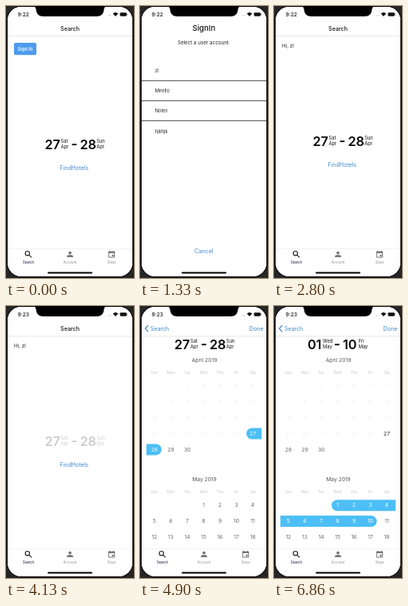
Recreate the animation shown at these times as an HTML page. Size 160 by 340 pixels, loop 8 s.

```html
<!DOCTYPE html>
<html lang="en">
<head>
<meta charset="utf-8">
<title>Hotel search</title>
<style>
html, body { margin: 0; width: 100%; height: 100%; overflow: hidden; background: #262626; }
svg { display: block; width: 100%; height: 100%; font-family: Inter, Roboto, sans-serif; }
</style>
</head>
<body>
<svg id="stage" viewBox="0 0 160 340"></svg>
<script>
const LOOP = 8000, STEP = 70;
const BLUE = '#4189cb', RANGE = '#4dbff6';
const HEADER = 38, TABS = 304, HEIGHT = 340, WIDTH = 156;

const text = (x, y, size, str, fill = '#111', extra = '') =>
  `<text x="${x}" y="${y}" font-size="${size}" fill="${fill}" ${extra}>${str}</text>`;
const mid = (x, y, size, str, fill, extra = '') =>
  text(x, y, size, str, fill, `text-anchor="middle" ${extra}`);
const rect = (x, y, w, h, fill, extra = '') =>
  `<rect x="${x}" y="${y}" width="${w}" height="${h}" fill="${fill}" ${extra}/>`;
const group = (id, body, extra = '') => `<g id="${id}" ${extra}>${body}</g>`;

// One big day number with weekday and month beside it; y is the vertical centre
const dateLabel = (x, y, [day, weekday, month], gap = 20) =>
  text(x, y + 5.7, 16.2, day, '#080808', 'font-weight="600" letter-spacing="-.2"') +
  text(x + gap, y - 2, 5.8, weekday) + text(x + gap, y + 5, 5.8, month);

const dateRange = (y, from, to, x = 48.5, gap = 20) =>
  dateLabel(x, y, from, gap) + rect(x + 34, y - .7, 5.7, 1.8, '#080808') +
  dateLabel(x + 44, y, to, gap + .7);

const APR27 = ['27', 'Sat', 'Apr'], APR28 = ['28', 'Sun', 'Apr'];
const MAY1 = ['01', 'Wed', 'May'], MAY10 = ['10', 'Fri', 'May'];

// Calendar
const colX = c => 18 + 20.5 * c;
const rowY = r => 19.8 * r;

function month(title, titleY, firstCol, count, rows, dayFill) {
  const top = titleY + 32;
  let out = mid(80.5, titleY + 2.4, 6.7, title, '#555');
  ['Sun', 'Mon', 'Tue', 'Wed', 'Thu', 'Fri', 'Sat'].forEach((name, c) => {
    out += mid(colX(c), titleY + 16.7, 4.7, name, '#c4c4c4');
  });
  for (let d = 1; d <= count; d++) {
    const cell = d - 1 + firstCol, r = Math.floor(cell / 7);
    if (r < rows) out += mid(colX(cell % 7), top + rowY(r) + 2.4, 6.6, d, dayFill(d));
  }
  return out;
}

// Selection bar: rounded on the left, on the right, or on both sides
function bar(x1, x2, y, left, right) {
  const h = 14, l = left ? h / 2 : 0, r = right ? h / 2 : 0;
  return `<path fill="${RANGE}" d="M${x1 + l} ${y - h / 2}H${x2 - r}a${r} ${r} 0 0 1 ${r} ${r}v${h - 2 * r}` +
    `a${r} ${r} 0 0 1 ${-r} ${r}H${x1 + l}a${l} ${l} 0 0 1 ${-l} ${-l}v${2 * l - h}a${l} ${l} 0 0 1 ${l} ${-l}z"/>`;
}

function calendar(stage) {
  const titles = [
    dateRange(48, APR27, APR28, 43),
    dateRange(48, MAY1, APR28, 42, 19),
    dateRange(48, MAY1, MAY10, 42, 19)
  ];
  const bars = [
    bar(133, 152, 159.5, true, false) + bar(8, 27, 179.4, false, true),
    bar(72, 89, 249.3, true, true),
    bar(72, 152, 249.3, true, false) + bar(8, 128.5, 269.1, false, true)
  ];
  const april = d => d < 27 ? '#f1f1f1' : stage === 0 && d < 29 ? '#fff' : d === 27 ? '#222' : '#666';
  const may = d => d <= [0, 1, 10][stage] ? '#fff' : '#666';
  return titles[stage] + bars[stage] +
    month('April 2019', 68, 1, 30, 5, april) + month('May 2019', 217, 3, 31, 5, may);
}

// Screens
const statusBar =
  '<path d="M34 0Q37 1 37.5 4C38 10 41 13 47 13H113C119 13 122 10 122.5 4Q123 1 126 0z"/>' +
  text(14.5, 13, 6.7, '', '#111', 'id="clock" font-weight="500"') +
  [128, 130.3].map(x => rect(x, 11.4, 1, 1, '#aaa')).join('') +
  '<path d="M133.6 9.6Q136.9 6.6 140.2 9.6L136.9 13z" fill="#111"/>' +
  rect(142.5, 8.2, 8.3, 4.5, '#111', 'rx="1.1"') + rect(151.3, 9.5, .8, 2, '#777');

const home = rect(2, HEADER, WIDTH, 270, '#fff') +
  group('signIn', rect(10, 46, 28, 15.3, '#4c9cec', 'rx="2"') +
    mid(24, 55.7, 5.6, 'Sign In', '#fff', 'font-weight="600"')) +
  text(10, 52.4, 6.3, 'Hi, zl', '#222', 'id="greeting"') +
  group('search', group('dates', dateRange(173, APR27, APR28)) +
    mid(85.2, 205.3, 7.1, 'FindHotels', BLUE));

const card = rect(-1, HEADER, 2, 270, '#000', 'opacity=".12"') +
  rect(1, HEADER, 1, 270, '#000', 'opacity=".5"') +
  rect(2, HEADER, WIDTH, 270, '#fff') +
  [0, 1, 2].map(i => group('calendar' + i, calendar(i))).join('');

const header = rect(2, 0, WIDTH, HEADER, '#fff') + rect(2, 37.6, WIDTH, .6, '#d5d5d5') +
  mid(80, 30.8, 7.1, 'Search', '#111', 'id="title" font-weight="500"') +
  group('back', `<path d="M10.2 24L6.6 28.2L10.2 32.4" fill="none" stroke="${BLUE}" stroke-width="1.2"/>` +
    text(13, 30.7, 7, 'Search', BLUE) +
    text(154.5, 30.7, 7.2, 'Done', BLUE, 'text-anchor="end"'));

const tabs = rect(2, TABS, WIDTH, 36, '#fff') + rect(2, TABS - .3, WIDTH, .4, '#ddd') +
  '<g fill="none" stroke="#222" stroke-width="1.1"><circle cx="26.8" cy="309.2" r="2.7"/><path d="M28.9 311.3L32 314.4"/></g>' +
  '<g fill="#777"><circle cx="80" cy="308.6" r="1.9"/><path d="M76.2 314v-1.2q0-1.7 3.8-1.7t3.8 1.7v1.2z"/></g>' +
  '<path d="M128.3 307.3h7.4v6.8h-7.4z" fill="none" stroke="#777"/>' +
  rect(128, 306.8, 8, 2.2, '#777') + rect(129.2, 305.8, 1, 1.5, '#777') + rect(133.8, 305.8, 1, 1.5, '#777') +
  rect(132.4, 310.8, 2.2, 2.2, '#777') +
  mid(28, 321.8, 4.2, 'Search', '#25254f', 'font-weight="500"') +
  mid(80, 321.8, 4.2, 'Account', '#909090') + mid(132, 321.8, 4.2, 'Stays', '#909090');

const modal = rect(2, 0, WIDTH, HEIGHT, '#fff') +
  mid(79.8, 29.7, 9.6, 'SignIn', '#111', 'font-weight="500"') +
  mid(79.8, 46.8, 6.25, 'Select a user account.', '#222') +
  ['zl', 'Mirello', 'Nolen', 'hjkhjk'].map((name, i) => {
    const y = 80 + 25.2 * i;
    return text(18.8, y + 2, 5.7, name, '#222', `id="user${i}"`) +
      (i < 3 ? rect(2, 92 + 25 * i, WIDTH, 1, '#555') : '');
  }).join('') +
  mid(79.8, 307.8, 7.2, 'Cancel', BLUE);

const stage = document.getElementById('stage');
stage.innerHTML =
  `<defs><clipPath id="screen">${rect(2, 1, WIDTH, 337, '#fff', 'rx="17"')}</clipPath></defs>` +
  rect(0, 0, 160, HEIGHT, '#262626') + rect(1, 0, 158, 339, '#000', 'rx="18"') +
  group('phone', rect(0, 0, 160, HEIGHT, '#fff') + group('home', home) + group('card', card) +
    header + tabs + group('modal', modal) + statusBar +
    rect(52, 332.5, 56, 2, '#000', 'rx="1"'), 'clip-path="url(#screen)"');

const el = id => document.getElementById(id);
const fade = (id, value) => el(id).setAttribute('opacity', value);
const show = (id, on) => el(id).setAttribute('display', on ? 'inline' : 'none');
const move = (id, x, y) => el(id).setAttribute('transform', `translate(${x.toFixed(2)} ${y.toFixed(2)})`);
const within = (t, from, to) => t >= from && t < to;

// Remaining distance of a critically damped spring, 1 to 0
function spring(ms) {
  const x = Math.max(0, ms) * Math.sqrt(1000 / 3) / 1000;
  return (1 + x) * Math.exp(-x);
}

function render(time) {
  const t = Math.floor(time / STEP) * STEP;
  const signedIn = t >= 2520;

  el('clock').textContent = t < 4130 ? '9:22' : '9:23';
  show('signIn', !signedIn);
  show('greeting', signedIn);
  fade('signIn', within(t, 770, 1050) ? .25 : 1);
  fade('dates', within(t, 3780, 4410) ? .2 : 1);
  move('search', 0, signedIn ? -4 : 0);

  show('modal', within(t, 980, 2800));
  move('modal', 0, HEIGHT * (t < 2520 ? spring(t - 885) : 1 - spring(t - 2450)));
  fade('user0', t >= 2170 ? .15 : 1);

  const left = t < 4340 ? 1 : t < 4900 ? spring(t - 4280) : 0;
  show('card', left < 1);
  move('card', WIDTH * left, 0);
  move('home', -.3 * WIDTH * (1 - left), 0);
  fade('title', left);
  fade('back', 1 - left);

  const picked = t < 5950 ? 0 : t < 6860 ? 1 : 2;
  for (let i = 0; i < 3; i++) show('calendar' + i, i === picked);
}

const start = performance.now();
function tick() {
  render((performance.now() - start) % LOOP);
  requestAnimationFrame(tick);
}
tick();
</script>
</body>
</html>
```
